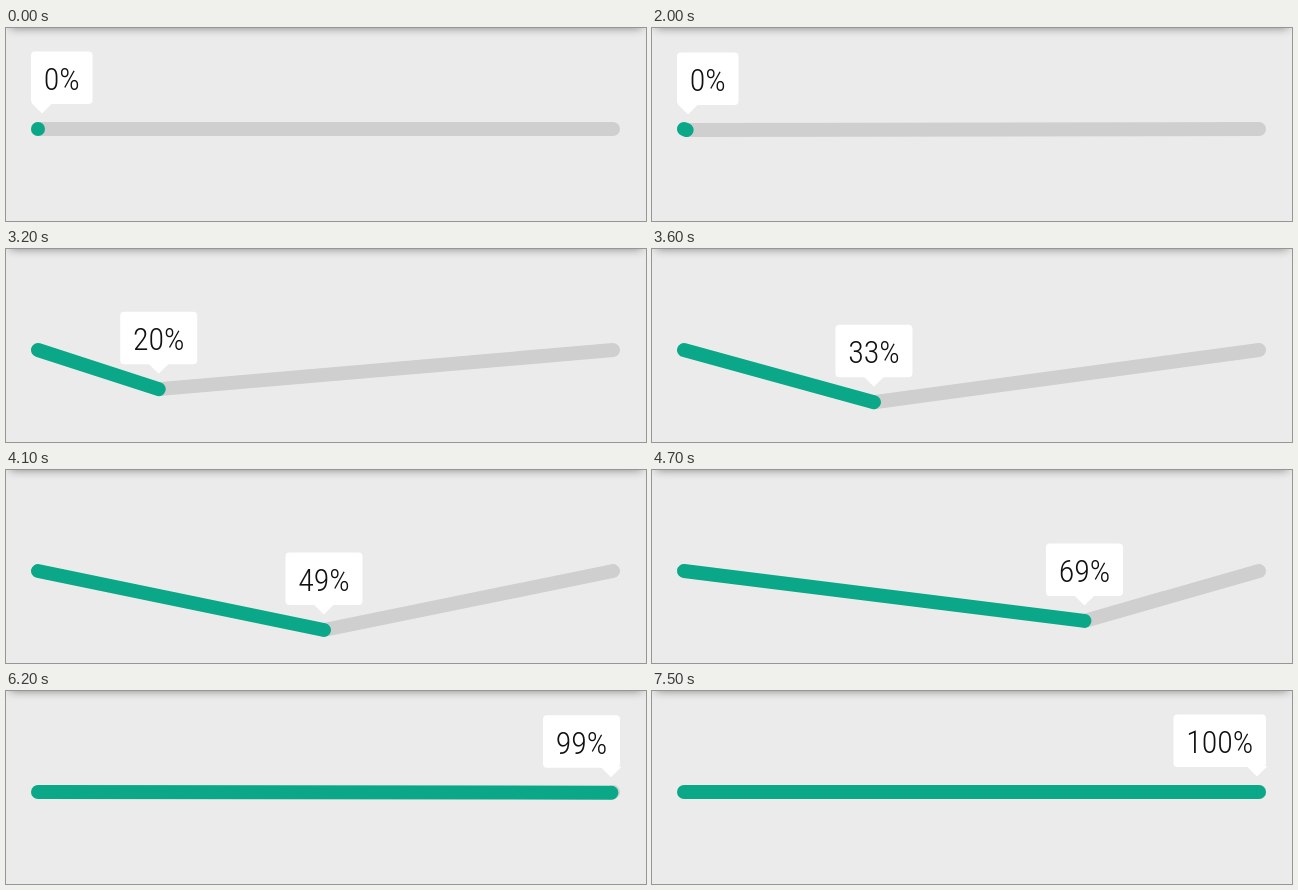
Write an HTML page that moves like this. It is 640 by 193 pixels and loops after 7.6 s.

```html
<!DOCTYPE html>
<html lang="en">
<head>
<meta charset="utf-8">
<title>Bending progress bar</title>
<style>
  html, body { margin: 0; width: 100%; height: 100%; overflow: hidden; background: #ebebeb; }
  svg { display: block; width: 100%; height: 100%; }
  path { fill: none; stroke-width: 14; stroke-linecap: round; }
  text {
    font: 300 32px "Roboto Condensed", Roboto, sans-serif;
    font-stretch: 75%;
    text-anchor: middle;
    fill: #111;
  }
</style>
</head>
<body>
<svg viewBox="0 0 640 193">
  <defs>
    <filter id="blur" x="-10%" y="-100%" width="120%" height="300%">
      <feGaussianBlur stdDeviation="5"/>
    </filter>
  </defs>
  <rect width="640" height="193" fill="#ebebeb"/>
  <rect x="4" y="-30" width="632" height="30" fill="#000" opacity=".45" filter="url(#blur)"/>
  <path id="track" stroke="#cfcfcf"/>
  <path id="fill" stroke="#0aa888"/>
  <g fill="#fff">
    <rect id="box" height="52.5" rx="4"/>
    <polygon id="tail"/>
  </g>
  <text id="label"></text>
</svg>
<script>
const LOOP = 7600, STEP = 100;
const LEFT = 32, RIGHT = 607, BASE = 101, SAG = 59, CAP = 7;
const [track, fill, box, tail, label] =
  ["track", "fill", "box", "tail", "label"].map(id => document.getElementById(id));

const clamp = (v, lo, hi) => Math.min(hi, Math.max(lo, v));

// Sine ease in and out, slightly quicker in the last third.
function progress(t) {
  const d = t - 4700;
  const u = clamp(0.6285 + d * (d < 0 ? 2.17e-4 : 2.25e-4), 0, 1);
  return (1 - Math.cos(Math.PI * u)) / 2;
}

function draw(t) {
  const p = progress(t);
  const x = LEFT + (RIGHT - LEFT) * p;
  const y = BASE + SAG * 4 * p * (1 - p);
  track.setAttribute("d", `M${x} ${y}L${RIGHT} ${BASE}`);
  fill.setAttribute("d", `M${LEFT} ${BASE}L${x} ${y}`);

  const value = String(Math.floor(p * 100 + 1e-6));
  const width = 46 + 15.5 * value.length;
  const left = clamp(x - width / 2, LEFT - CAP, RIGHT + CAP - width);
  const bottom = y - 25;
  box.setAttribute("x", left);
  box.setAttribute("y", bottom - 52.5);
  box.setAttribute("width", width);

  const tip = clamp(x, LEFT + 4, RIGHT - 2);
  tail.setAttribute("points",
    `${tip - 10.5},${bottom - 1} ${tip + 10.5},${bottom - 1} ${tip},${bottom + 9.5}`);

  label.textContent = value + "%";
  label.setAttribute("x", left + width / 2);
  label.setAttribute("y", bottom - 14);
}

const start = performance.now();
function tick() {
  const t = (performance.now() - start) % LOOP;
  draw(Math.floor(t / STEP) * STEP);
  requestAnimationFrame(tick);
}
tick();
</script>
</body>
</html>
```
